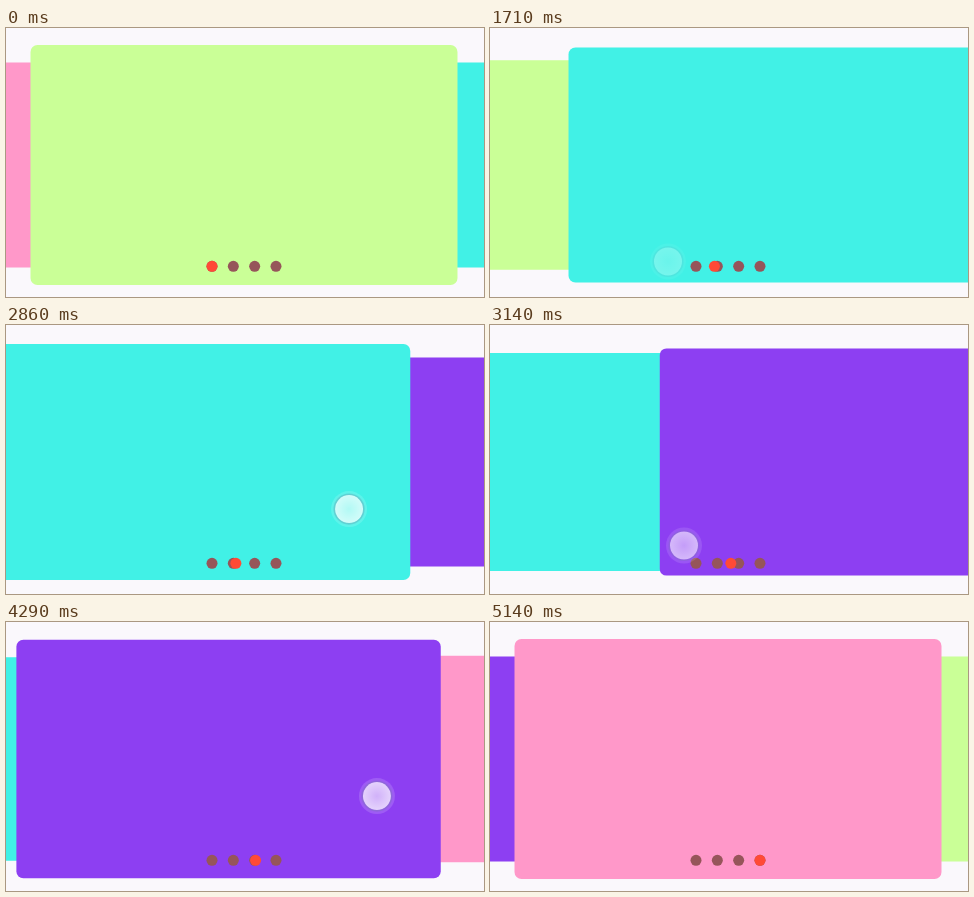
An HTML page with a canvas for the animation above (5.71 s loop, 478 by 269 pixels).

```html
<!DOCTYPE html>
<html lang="en">
<head>
<meta charset="utf-8">
<title>Card carousel</title>
<style>
  html, body { margin: 0; width: 100%; height: 100%; overflow: hidden; background: #faf8fc; }
  canvas { display: block; width: 478px; height: 269px; }
</style>
</head>
<body>
<canvas></canvas>
<script>
const W = 478, H = 269, LOOP = 5710, FPS = 7;
const CARD = { x: 238, y: 137, w: 427, h: 240, r: 7, shrink: 0.146 };
const COLORS = ['#caff97', '#41f1e6', '#8d3ff2', '#ff98c9'];

// All times below are in animation steps.
const SWIPES = [
  { press: 4, move: 5, release: 11, x: 399, y: 179.5 },
  { press: 18, move: 17, release: 21.7, x: 415, y: 166.5 },
  { press: 28, move: 28, release: 32, x: 410, y: 164.5 }
];
const TRAVEL = { x: -221, y: 54 };
const SLOP = 21, SETTLE = 4.2, FADE = 1.5;

const canvas = document.querySelector('canvas');
const ctx = canvas.getContext('2d');
const ratio = window.devicePixelRatio || 1;
canvas.width = Math.round(W * ratio);
canvas.height = Math.round(H * ratio);
ctx.scale(ratio, ratio);

const clamp = v => Math.max(0, Math.min(1, v));

// Share of the finger's path covered, speeding up until release
const fingerShare = ({ move, release }, step) =>
  clamp((step - move) / (release - move)) ** 2.5;

// The page follows the finger past the slop, then settles with a quintic ease-out.
function swipeProgress(swipe, step) {
  const travelled = -TRAVEL.x * fingerShare(swipe, step);
  const dragged = Math.max(0, travelled - SLOP) / CARD.w;
  const left = (1 - clamp((step - swipe.release) / SETTLE)) ** 5;
  return 1 - (1 - dragged) * left;
}

function circle(x, y, r, fill) {
  ctx.beginPath();
  ctx.arc(x, y, r, 0, Math.PI * 2);
  ctx.fillStyle = fill;
  ctx.fill();
}

function drawCard(index, offset) {
  const lost = CARD.shrink * Math.abs(offset);
  const scale = 1 - lost;
  const w = CARD.w * scale, h = CARD.h * scale;
  const x = CARD.x + CARD.w * (offset - Math.sign(offset) * lost);
  ctx.beginPath();
  ctx.roundRect(x - w / 2, CARD.y - h / 2, w, h, CARD.r * scale);
  ctx.fillStyle = COLORS[(index + COLORS.length) % COLORS.length];
  ctx.fill();
}

function drawDots(position) {
  const dotX = i => 206 + i * 21.33;
  COLORS.forEach((_, i) => circle(dotX(i), 238.3, 5.5, '#96555a'));
  circle(dotX(position), 238.3, 5.5, '#ff4a36');
}

function drawTouch(swipe, step) {
  const opacity = 1 - clamp((step - swipe.release) / FADE);
  if (step < swipe.press || opacity === 0) return;
  const share = fingerShare(swipe, step);
  const x = swipe.x + TRAVEL.x * share, y = swipe.y + TRAVEL.y * share;
  ctx.globalAlpha = opacity;
  circle(x, y, 18, 'rgba(255,255,255,0.15)');
  const glow = ctx.createRadialGradient(x, y, 0, x, y, 14);
  glow.addColorStop(0, 'rgba(255,255,255,0.52)');
  glow.addColorStop(1, 'rgba(255,255,255,0.73)');
  circle(x, y, 14, glow);
  ctx.beginPath();
  ctx.arc(x, y, 14.8, 0, Math.PI * 2);
  ctx.strokeStyle = 'rgba(110,130,160,0.3)';
  ctx.lineWidth = 1.6;
  ctx.stroke();
  ctx.globalAlpha = 1;
}

function draw(time) {
  const step = Math.floor((time + 5) * FPS / 1000);
  const position = SWIPES.reduce((sum, swipe) => sum + swipeProgress(swipe, step), 0);
  ctx.fillStyle = '#faf8fc';
  ctx.fillRect(0, 0, W, H);
  const base = Math.floor(position);
  [-1, 0, 1, 2]
    .map(i => [base + i, base + i - position])
    .sort((a, b) => Math.abs(b[1]) - Math.abs(a[1]))
    .forEach(([index, offset]) => drawCard(index, offset));
  drawDots(position);
  SWIPES.forEach(swipe => drawTouch(swipe, step));
}

const began = performance.now();
function tick() {
  draw((performance.now() - began) % LOOP);
  requestAnimationFrame(tick);
}
tick();
</script>
</body>
</html>
```
